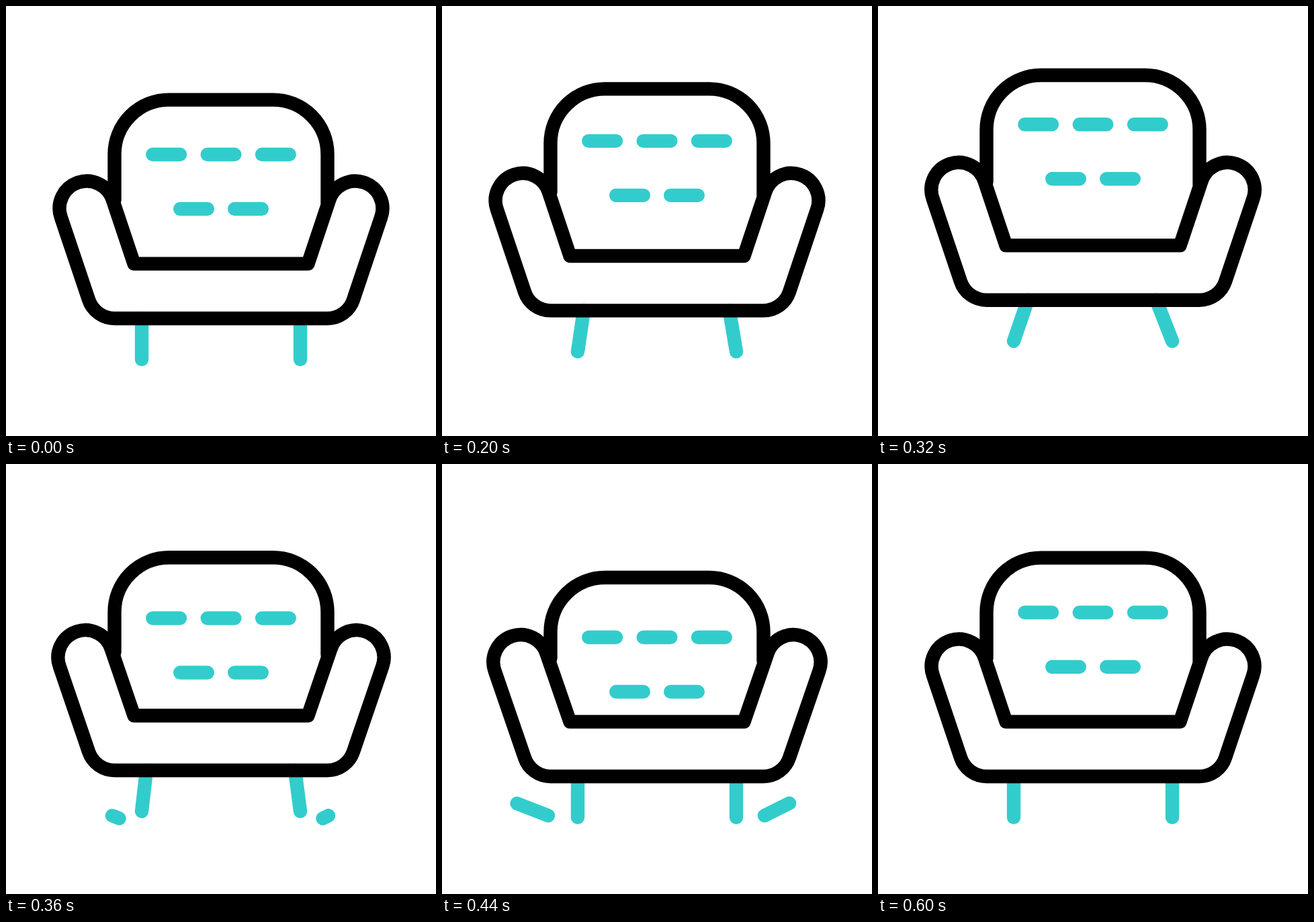
Animation, 640 px wide and 640 px high, one loop 1.48 s. Source, as an HTML page:

```html
<!DOCTYPE html>
<html lang="en">
<head>
<meta charset="utf-8">
<title>Bouncing sofa</title>
<style>
  html, body { margin: 0; width: 100%; height: 100%; overflow: hidden; background: #fff; }
  svg { display: block; width: 100vw; height: 100vh; }
  path { fill: none; stroke-width: 20.4; stroke-linecap: round; stroke-linejoin: round; }
  .teal { stroke: #3cc; }
  .ink { stroke: #000; }
</style>
</head>
<body>
<svg viewBox="0 0 640 640">
  <path class="teal" id="legs"/>
  <path class="teal" id="dust"/>
  <path class="ink" id="back"/>
  <path class="teal" id="buttons" d="M218.3 221h40.7M299.7 221h40.6M381 221h40.7M259.2 302h40.6M340.2 302h40.6"/>
  <path class="ink" id="seat"/>
</svg>
<script>
const LOOP = 1480, STEP = 40, START = 160, END = 600;
const el = id => document.getElementById(id);

// Vertical offsets as [time, value] pairs, joined by straight lines.
const seatKeys = [[160, -6.5], [280, -22], [320, -27.2], [380, 0]];
const backKeys = [[160, -9.5], [320, -36.6], [360, -0.4], [400, 36.8], [600, 0]];
const buttonKeys = [[160, -12], [320, -44.7], [360, 8.5], [400, 46.2], [600, 0]];
const armKeys = [[240, 0], [320, 0.5], [400, 8.1], [600, 0]];

function track(keys, t) {
  if (t <= keys[0][0]) return keys[0][1];
  for (let i = 1; i < keys.length; i++) {
    const [t0, a] = keys[i - 1], [t1, b] = keys[i];
    if (t <= t1) return a + (b - a) * (t - t0) / (t1 - t0);
  }
  return keys[keys.length - 1][1];
}

function smooth(t, from, to) {
  const u = Math.min(1, Math.max(0, (t - from) / (to - from)));
  return u * u * (3 - 2 * u);
}

// Part of a straight line between the fractions a and b.
function trim(x0, y0, x1, y1, a, b) {
  if (b - a < 0.001) return "";
  const at = p => `${x0 + (x1 - x0) * p} ${y0 + (y1 - y0) * p}`;
  return `M${at(a)}L${at(b)}`;
}

function seatPath(y, spread) {
  const dx = spread / 2, top = y - spread;
  const left = 82 - dx, inner = 159 - dx;
  return `M190.5 ${383.6 + y}L${inner} ${289.3 + top}` +
    `A40.6 40.6 0 1 0 ${left} ${315 + top}` +
    `L123 ${437.1 + y}A40.7 40.7 0 0 0 161.6 ${465 + y}` +
    `H478.4A40.7 40.7 0 0 0 517 ${437.1 + y}` +
    `L${640 - left} ${315 + top}` +
    `A40.6 40.6 0 1 0 ${640 - inner} ${289.3 + top}` +
    `L449.5 ${383.6 + y}Z`;
}

function draw(time) {
  const loopTime = time % LOOP;
  const t = Math.floor(loopTime / STEP) * STEP;
  const moving = t >= START && t < END;
  const value = keys => moving ? track(keys, t) : 0;
  const y = value(seatKeys), b = value(backKeys);

  el("seat").setAttribute("d", seatPath(y, value(armKeys)));
  el("back").setAttribute("d",
    `M161.5 ${289 + y}V${220.6 + b}a81 81 0 0 1 81 -81` +
    `H397.5a81 81 0 0 1 81 81V${293 + y}`);
  el("buttons").setAttribute("transform", `translate(0 ${value(buttonKeys)})`);
  el("legs").setAttribute("d",
    `M${202 - y * 0.77} ${465 + y}L202 ${526 + y}` +
    `M${438 + y * 0.88} ${465 + y}L438 ${526 + y}`);

  const tail = smooth(t, 400, 560), head = smooth(t, 320, 480);
  el("dust").setAttribute("d",
    trim(168.5, 527.5, 101, 501, tail, head) +
    trim(471.5, 527.5, 525.5, 500.8, tail, head));
}

const origin = performance.now();
function frame() {
  draw(performance.now() - origin);
  requestAnimationFrame(frame);
}
frame();
</script>
</body>
</html>
```
